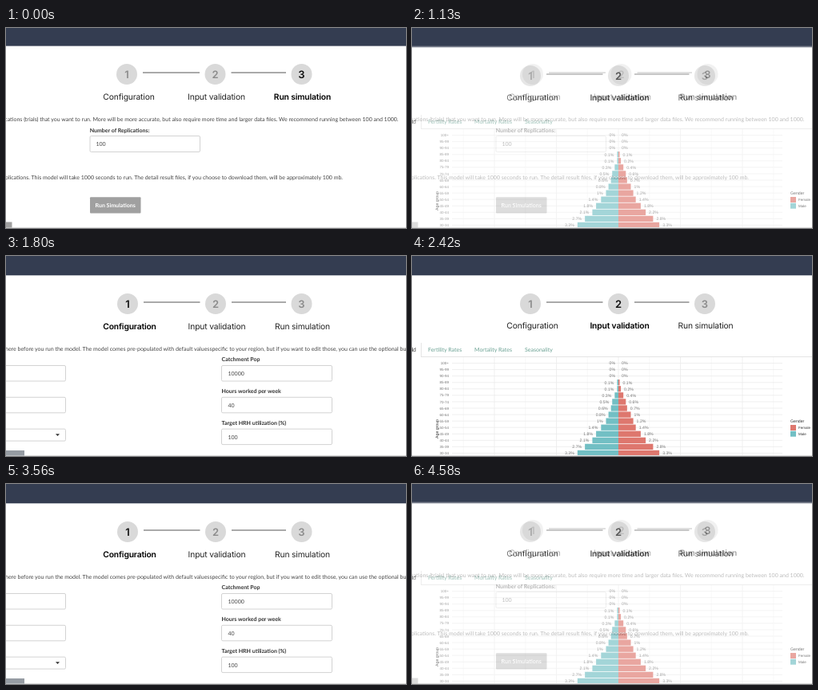
Animation of 500x251 px, one loop 4.65 s. Source, as an HTML page:

```html
<!DOCTYPE html>
<html lang="en">
<head>
<meta charset="utf-8">
<title>Simulation steps</title>
<style>
  html, body { margin: 0; width: 100%; height: 100%; overflow: hidden; background: #fff; }
  svg { display: block; width: 500px; height: 251px; }
  text { font: 7px Lato, sans-serif; fill: #444; text-rendering: geometricPrecision; }
  .label { font-weight: 700; fill: #333; }
  .step { font: 10.3px Inter, sans-serif; letter-spacing: -.15px; fill: #222; text-anchor: middle; }
  .num { font: 600 13px Inter, sans-serif; fill: #8c8c8c; text-anchor: middle; }
  .step.on { font-weight: 600; fill: #000; }
  .num.on { fill: #111; }
  .tab { fill: #69a092; }
  .chart { font: 5.2px "Liberation Sans", Arial, sans-serif; fill: #777; }
  .small { font-size: 4.5px; }
  .dark { fill: #333; }
  .end { text-anchor: end; }
  .mid { text-anchor: middle; }
</style>
</head>
<body>
<svg id="stage" viewBox="0 0 500 251"></svg>
<script>
const TEAL = '#72bfc4', RED = '#de776e';

const text = (x, y, s, cls = '', extra = '') => `<text x="${x}" y="${y}" class="${cls}" ${extra}>${s}</text>`;
const rect = (x, y, w, h, fill, extra = '') =>
  `<rect x="${x}" y="${y}" width="${w}" height="${h}" fill="${fill}" ${extra}/>`;
const line = (x1, y1, x2, y2, color, width = 1) =>
  `<path d="M${x1} ${y1}L${x2} ${y2}" stroke="${color}" stroke-width="${width}"/>`;
const box = (x, y, w, h) => rect(x, y, w, h, '#fff', 'stroke="#d3d3d3" rx="1.5"');

// Navigation bar and stepper shared by all pages
function header(active, barHeight, xs, cy, baseline) {
  let out = rect(0, 0, 500, 251, '#fff') + rect(0, 0, 500, barHeight, '#343d51');
  ['Configuration', 'Input validation', 'Run simulation'].forEach((name, i) => {
    const on = i === active ? ' on' : '';
    out += `<circle cx="${xs[i]}" cy="${cy}" r="13" fill="#d9d9d9"/>`
      + text(xs[i], cy + 5, i + 1, 'num' + on)
      + text(xs[i] + 3 + i * -.5 + (i === 0 ? .5 : 0) - 1, baseline, name, 'step' + on);
    if (i) out += line(xs[i - 1] + 20, cy - 2, xs[i] - 19.5, cy - 2, '#555');
  });
  return out + line(0, 250.5, 500, 250.5, '#dedede');
}

function configuration() {
  let out = header(0, 24.3, [152, 262, 369.5], 60, 92)
    + text(-1, 119, 'here before you run the model. The model comes pre-populated with default valuesspecific to your region, but if you want to edit those, you can use the optional button at');
  [['Catchment Pop', 10000], ['Hours worked per week', 40], ['Target HRH utilization (%)', 100]]
    .forEach(([name, value], i) => {
      const y = 137.5 + i * 39.8;
      out += text(269.5, y - 5.3, name, 'label')
        + box(269.5, y, 138, 19.5) + text(277.5, y + 12.5, value)
        + box(-9.5, y, 84, i < 2 ? 19.5 : 15);
    });
  return out + '<path d="M62 223.3h5l-2.5 2.6z" fill="#333"/>' + rect(-5, 244, 28, 6.5, '#969ca3');
}

function validation() {
  const female = [0, 0, 0, .1, .2, .4, .6, .7, 1, 1.2, 1.4, 1.8, 2.2, 2.8, 3.3];
  const male = [0, 0, 0, .1, .1, .3, .5, .6, .8, 1, 1.4, 1.8, 2.1, 2.7, 3.3];
  const cx = 258, unit = 15.5;
  let out = header(1, 24.3, [148, 258, 366], 60, 91)
    + text(5, 120, 'ld', 'end dark') + text(20, 120, 'Fertility Rates', 'tab')
    + text(78, 120, 'Mortality Rates', 'tab') + text(141, 120, 'Seasonality', 'tab')
    + line(11, 126.5, 500, 126.5, '#e4e4e4') + line(11.5, 109, 11.5, 126, '#e4e4e4');
  for (let k = -5; k <= 5; k++)
    out += line(cx + k * 2.5 * unit, 127, cx + k * 2.5 * unit, 250, '#ebebeb', k % 2 ? .4 : .8);
  male.forEach((m, i) => {
    const y = 134.5 + i * 8.07, f = female[i], left = cx - m * unit, right = cx + f * unit;
    out += line(50, y, 463, y, '#ebebeb', .8)
      + rect(left, y - 3.65, m * unit, 7.3, TEAL) + rect(cx, y - 3.65, f * unit, 7.3, RED)
      + text(left - 4, y + 1.8, m + '%', 'chart end') + text(right + 4, y + 1.8, f + '%', 'chart')
      + text(46, y + 1.6, i ? `${100 - 5 * i}-${104 - 5 * i}` : '100+', 'chart small end');
  });
  return out + text(0, 0, 'Age group', 'chart dark mid', 'transform="translate(32.5 217) rotate(-90)"')
    + text(473, 208.5, 'Gender', 'chart dark')
    + rect(473, 212, 7, 7, RED) + text(483, 217.2, 'Female', 'chart small dark')
    + rect(473, 219.7, 7, 7, TEAL) + text(483, 225, 'Male', 'chart small dark')
    + line(0, 250.5, 500, 250.5, '#dedede');
}

function run() {
  return header(2, 22.6, [151, 261.5, 369.5], 58, 89.8)
    + text(490.5, 117, 'replications (trials) that you want to run. More will be more accurate, but also require more time and larger data files. We recommend running between 100 and 1000.', 'end')
    + text(104.7, 130.5, 'Number of Replications:', 'label')
    + box(105, 135.5, 137.5, 20) + text(112.5, 148.2, 100)
    + text(421, 190, 'of replications. This model will take 1000 seconds to run. The detail result files, if you choose to download them, will be approximately 100 mb.', 'end')
    + rect(105, 212.3, 63.5, 20.2, '#a0a0a0', 'rx="1"')
    + text(136.7, 225, 'Run Simulations', 'label mid', 'style="fill:#fff"')
    + rect(-5, 243.5, 12.5, 7, '#a0a0a0');
}

const stage = document.getElementById('stage');
stage.innerHTML = [configuration, validation, run].map(page => `<g>${page()}</g>`).join('');
const pages = [...stage.children];

// [start ms, page position]; fractions are cross-fades to the next page
const LOOP = 4650;
const timeline = [
  [0, 2], [70, 0], [530, .36], [590, .7], [660, 1], [1130, 1.35], [1200, 1.7], [1270, 2],
  [1800, 0], [2280, .36], [2350, .7], [2420, 1], [2880, 1.35], [2940, 1.7], [3010, 2],
  [3560, 0], [4030, .5], [4100, 1], [4580, 1.35]
];

const start = performance.now();
function draw() {
  const t = (performance.now() - start) % LOOP;
  const position = timeline.findLast(([time]) => time <= t)[1];
  pages.forEach((page, i) => page.setAttribute('opacity', Math.max(0, Math.min(1, position - i + 1))));
  requestAnimationFrame(draw);
}
draw();
</script>
</body>
</html>
```
